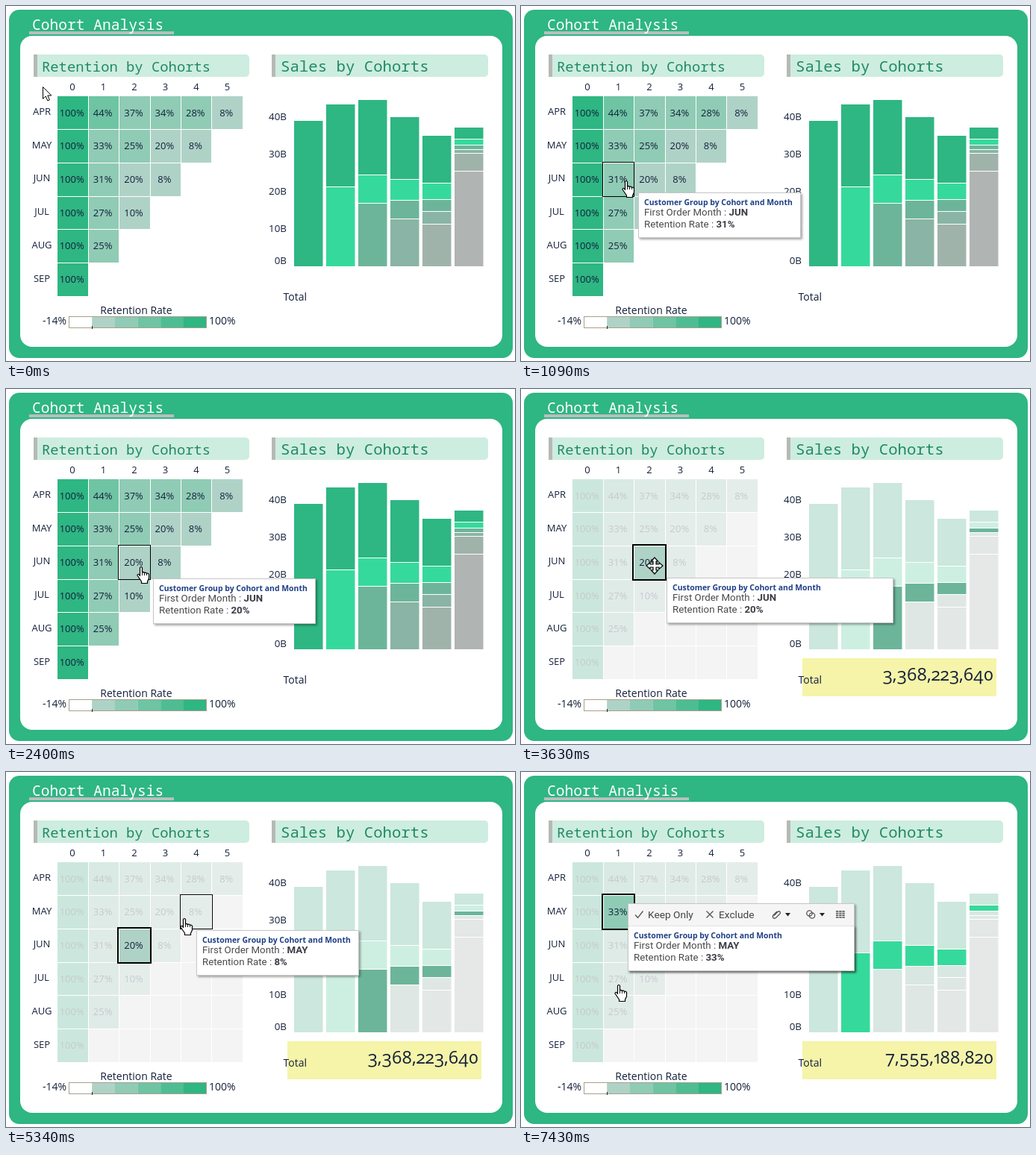
Animation of 682 by 476 pixels, one loop 8000 ms. Source, as an HTML page:

```html
<!DOCTYPE html>
<html lang="en">
<head>
<meta charset="utf-8">
<title>Cohort Analysis</title>
<style>
  html, body { margin: 0; width: 100%; height: 100%; overflow: hidden; background: #fff; }
  svg { display: block; }
  text { font: 13px "Open Sans", "Noto Sans", sans-serif; fill: #14203a; }
  .mono { font-family: "Noto Sans Mono", "DejaVu Sans Mono", monospace; font-weight: 500; }
  .old { font-variant-numeric: oldstyle-nums; }
  .label { font-weight: 500; }
  .mid { text-anchor: middle; }
  .end { text-anchor: end; }
  .tip { font: 13.3px Roboto, sans-serif; fill: #4a4a4a; }
  .tip tspan { font-weight: 700; fill: #3c3c46; }
  .tipTitle { font-weight: 700; font-size: 10.45px; fill: #1f3f86; }
  .tool { font: 13.7px Roboto, sans-serif; fill: #444; }
  .line { fill: none; stroke: #555; stroke-width: 1.3; }
</style>
</head>
<body>
<svg id="stage" width="682" height="476" viewBox="0 0 682 476">
  <defs>
    <filter id="shadow" x="-10%" y="-20%" width="120%" height="150%">
      <feDropShadow dx="2" dy="2" stdDeviation="1.5" flood-color="#000" flood-opacity=".35"/>
    </filter>
  </defs>
  <g id="base"></g>
  <g id="scene"></g>
</svg>
<script>
const LOOP = 8000;
const MONTHS = ['APR', 'MAY', 'JUN', 'JUL', 'AUG', 'SEP'];
const RATES = [
  [100, 44, 37, 34, 28, 8], [100, 33, 25, 20, 8], [100, 31, 20, 8],
  [100, 27, 10], [100, 25], [100]
];
const RAMP = ['#fff', '#afd2c7', '#8fcbb5', '#6ec4a3', '#4ebd93', '#2eb683'];
const BAR_COLORS = ['#2eb683', '#36d99c', '#6cb59a', '#8ab4a5', '#a0b3ab', '#b0b4b2'];
const BAR_TOPS = [
  [154], [132, 242], [126, 226, 264], [149, 232, 260, 285],
  [174, 237, 259, 275, 292], [163, 178, 186, 192, 197, 221]
];
const BAR_BASE = 349;
const GRID = { x: 69, y: 121, w: 41.4, h: 44.7 };

// Pointer moves: start, end, number of steps, destination
const MOVES = [
  [310, 770, 7, 136, 182], [940, 1090, 3, 141, 234], [1400, 1630, 4, 145, 273],
  [1940, 2090, 3, 169, 268], [2320, 2400, 2, 181, 238], [2570, 2640, 2, 209, 239],
  [3100, 3270, 3, 179, 237], [4090, 4620, 8, 286, 196], [5020, 5100, 2, 263, 196],
  [5250, 5330, 2, 239, 196], [5410, 5570, 3, 230, 199], [5800, 6190, 6, 128, 194],
  [6807, 7110, 5, 132, 274], [7280, 7430, 3, 131, 285]
];
const CLICKS = [
  { row: 2, col: 2, x: 179, y: 237, press: 3420, apply: 3570, widen: 3625, tools: 3710, release: 4085, total: '3,368,223,640' },
  { row: 1, col: 1, x: 128, y: 194, press: 6410, apply: 6580, widen: 6655, tools: 6730, release: LOOP, total: '7,555,188,820' }
];

const rect = (x, y, w, h, fill, more = '') =>
  `<rect x="${x}" y="${y}" width="${w}" height="${h}" fill="${fill}" ${more}/>`;
const text = (x, y, str, cls = '', style = '') =>
  `<text x="${x}" y="${y}" class="${cls}" style="${style}">${str}</text>`;
const path = (d, attrs) => `<path d="${d}" ${attrs}/>`;
const at = (x, y, content) => `<g transform="translate(${x} ${y})">${content}</g>`;
const columnX = col => GRID.x + GRID.w * col;
const rowY = row => GRID.y + GRID.h * row;
const rampColor = rate => RAMP[Math.min(5, Math.floor((rate + 14) / 19))];
const same = (a, b) => a && b && a.row === b.row && a.col === b.col;

function header(x, w, title, textX, size) {
  return rect(x, 65, w, 30, '#cdede0', 'rx="5"') + rect(x, 65, 5, 30, '#b5b9b7') +
    text(textX, 88, title, 'mono', `font-size:${size}px;fill:#1f8a64`);
}

function drawBase() {
  let out = rect(4, 5, 675, 467, '#2eb683', 'rx="14"') + rect(19, 40, 646, 417, '#fff', 'rx="16"') +
    rect(31, 34, 194, 4, '#b9bfbc') +
    text(35, 32, 'Cohort Analysis', 'mono', 'font-size:19.6px;fill:#fff') +
    header(37, 289, 'Retention by Cohorts', 48, 18.85) + header(356, 290, 'Sales by Cohorts', 368, 20.7);
  MONTHS.forEach((month, i) => {
    out += text(89 + 41.5 * i, 113, i, 'label mid') +
      text(48, 146 + GRID.h * i, month, 'label mid');
  });
  [148, 198, 248, 298, 341].forEach((y, i) => {
    out += text(376, y + 5, `${40 - 10 * i}B`, 'label end', 'font-size:13.4px');
  });
  RAMP.forEach((color, i) => out += rect(84.5 + i * 30.67, 416.5, 30.8, 15, color));
  out += rect(84.5, 416.5, 184, 15, 'none', 'stroke="#a8a08e"') + rect(115, 429, 1, 4, '#222') +
    text(174.5, 413, 'Retention Rate', 'mid', 'font-size:14px') +
    text(81, 427, '-14%', 'end', 'font-size:14px') + text(272, 427, '100%', '', 'font-size:14px');
  return out;
}

function drawCells(selected) {
  let out = '';
  for (let row = 0; row < 6; row++) for (let col = 0; col < 6; col++) {
    const rate = RATES[row][col];
    const x = Math.ceil(columnX(col)), y = Math.ceil(rowY(row));
    const w = Math.ceil(columnX(col + 1)) - x - 1, h = Math.ceil(rowY(row + 1)) - y - 1;
    if (selected) out += rect(x, y, w, h, '#f4f4f4');
    if (rate === undefined) continue;
    const alpha = selected && !same(selected, { row, col }) ? .2 : 1;
    out += `<g opacity="${alpha}">` + rect(x, y, w, h, rampColor(rate)) +
      text(columnX(col) + 19.2, rowY(row) + 26.5, rate + '%', 'mid') + '</g>';
  }
  return out;
}

function drawBars(selected) {
  let out = '';
  BAR_TOPS.forEach((tops, bar) => tops.forEach((edge, i) => {
    const top = i ? edge + 1 : edge;
    const bottom = tops[i + 1] || BAR_BASE;
    const box = [386 + 43 * bar, top, 38.5, bottom - top];
    const dim = selected && selected.row !== i;
    if (dim) out += rect(...box, '#f4f4f4');
    out += rect(...box, BAR_COLORS[i], `opacity="${dim ? .2 : 1}"`);
  }));
  return out;
}

function drawTotal(selected) {
  const band = selected ? rect(377, 361, 260, 51, '#f5f4a9') +
    text(633, 391, selected.total, 'old label end', 'font-size:23.5px') : '';
  return band + text(371.5, 395, 'Total', 'label', 'font-size:14px');
}

function outline({ row, col }, weight) {
  const grow = (weight - 1) / 2;
  const x = Math.floor(columnX(col) - 1) + .5, y = Math.floor(rowY(row) - 1) + .5;
  const w = Math.floor(columnX(col + 1)) + .5 - x, h = Math.floor(rowY(row + 1)) + .5 - y;
  return rect(x - grow, y - grow, w + 2 * grow, h + 2 * grow, 'none', `stroke="#000" stroke-width="${weight}"`);
}

function drawTools() {
  const caret = x => path(`M${x} 13h7l-3.5 4.5z`, 'fill="#222"');
  let out = path('M10 15.5l3.5 4 7-9', 'class="line"') + text(27, 20, 'Keep Only', 'tool') +
    path('M105.5 10.5l9 9m0-9l-9 9', 'class="line"') + text(122, 20, 'Exclude', 'tool') +
    path('M196 16.5l5-5q2-1.5 3 0t0 2.5l-5.5 5.5q-2 1.5-3.5 0t0-3.5l5-5', 'class="line" stroke-width="1"') +
    caret(211) + caret(257) +
    '<circle cx="243.5" cy="13.5" r="3.7" class="line"/><circle cx="247" cy="16.5" r="3.7" class="line"/>';
  for (let r = 0; r < 4; r++) for (let c = 0; c < 3; c++)
    out += rect(279 + 4.2 * c, 10 + 2.7 * r, 3.4, 1.6, '#555');
  return out;
}

function drawTip(x, y, cell, wide, tools) {
  const w = wide ? 303 : 217;
  const rate = RATES[cell.row][cell.col];
  const panel = h => rect(.5, .5, w, h, '#fff', 'stroke="#c6c6c6" filter="url(#shadow)"');
  let out = panel(60);
  if (tools) out += `<g opacity="${tools}" transform="translate(0 -30)">` + panel(90) +
    rect(1, 1, w - 1, 29, '#f5f5f5') + rect(1, 30, w - 1, 1, '#e2e2e2') + drawTools() + '</g>';
  out += text(8, 17, 'Customer Group by Cohort and Month', 'tipTitle') +
    text(8, 31, `First Order Month : <tspan>${MONTHS[cell.row]}</tspan>`, 'tip') +
    text(8, 47, `Retention Rate : <tspan>${rate === undefined ? '' : rate + '%'}</tspan>`, 'tip');
  // The toolbar nudges the panel up and left
  return tools ? at(x - 1, y - 4, out) : at(x, y, out);
}

const CURSORS = {
  arrow: path('M.5 .5v16l3.7-3.5 2.6 6 2.6-1.1-2.6-5.9h5z', 'fill="#fff" stroke="#000"'),
  hand: path('M-1.5 1.5q1.5-2 3 0v6.500q1.5-1.2 3 .5 1.7-1 3 .8 2.2-.8 3 1.2v5.5l-2 4v2.5h-8v-2.5l-5.5-8q0-2 2-1.5l1.5 2z',
    'fill="#fff" stroke="#000" stroke-width="1.2" stroke-linejoin="round"') +
    path('M1.5 8v4m3-3.5v3.5m3-3v3', 'stroke="#000" stroke-width=".9" fill="none"'),
  move: path('M0-11l4.5 5h-2.5v4h4v-2.5l5 4.5-5 4.5v-2.5h-4v4h2.5l-4.5 5-4.5-5h2.5v-4h-4v2.5l-5-4.5 5-4.5v2.5h4v-4h-2.5z',
    'fill="#fff" stroke="#000" stroke-width="1.2"')
};

function pointerAt(t) {
  let x = 49, y = 108;
  for (const [start, end, steps, toX, toY] of MOVES) {
    if (t < start) break;
    const step = Math.min(steps, Math.floor((t - start) / ((end - start) / (steps - 1)) + 1.15));
    const ease = 1 - (1 - step / steps) ** 3;
    x += (toX - x) * ease;
    y += (toY - y) * ease;
  }
  return { x: Math.round(x), y: Math.round(y) };
}

function cellAt({ x, y }) {
  const col = Math.floor((x - GRID.x) / GRID.w), row = Math.floor((y - GRID.y) / GRID.h);
  return col >= 0 && col < 6 && row >= 0 && row < 6 ? { row, col } : null;
}

function drawScene(t) {
  const pointer = pointerAt(t);
  const over = cellAt(pointer);
  const selected = CLICKS.filter(c => t >= c.apply).pop();
  const pinned = CLICKS.find(c => t >= c.press && t < c.release);
  const hasMark = over && (selected || RATES[over.row][over.col] !== undefined);
  let out = drawCells(selected) + drawBars(selected) + drawTotal(selected);

  if (selected) out += outline(selected, 2);
  if (pinned) {
    const fade = t < pinned.tools ? 0 : Math.min(1, (Math.floor((t - pinned.tools) / 75) + 1) / 3);
    out += outline(pinned, 2) +
      drawTip(pinned.x + 16, pinned.y + 16, pinned, t >= pinned.widen, fade);
  } else if (hasMark) {
    out += outline(over, 1) + drawTip(pointer.x + 16, pointer.y + 16, over);
  }
  const cursor = !over ? 'arrow' : same(over, selected) ? 'move' : 'hand';
  return out + at(pointer.x, pointer.y, CURSORS[cursor]);
}

const scene = document.getElementById('scene');
document.getElementById('base').innerHTML = drawBase();
const begin = performance.now();
let shown = '';
function tick() {
  const markup = drawScene((performance.now() - begin) % LOOP);
  if (markup !== shown) scene.innerHTML = shown = markup;
  requestAnimationFrame(tick);
}
tick();
</script>
</body>
</html>
```
